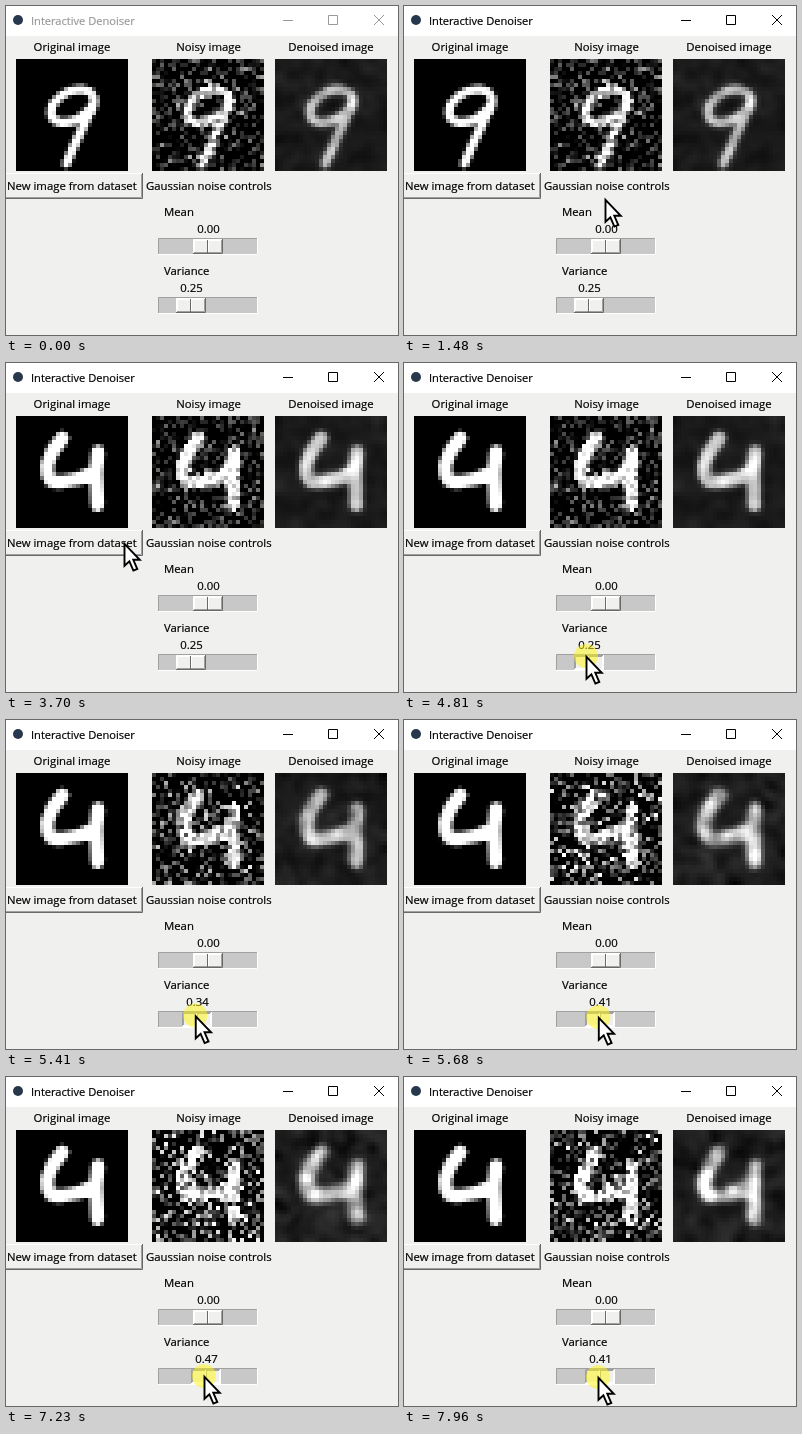
An HTML page with a canvas that plays this animation: 392 by 329 pixels, repeating every 8 s.

```html
<!DOCTYPE html>
<html lang="en">
<head>
<meta charset="utf-8">
<title>Interactive Denoiser</title>
<style>
html, body { margin: 0; width: 100%; height: 100%; overflow: hidden; background: #f0f0ef; }
#stage { position: relative; width: 392px; height: 329px; overflow: hidden; }
#stage > * { position: absolute; top: 0; left: 0; }
canvas { image-rendering: pixelated; width: 112px; height: 112px; }
#stage > canvas { top: 53px; }
#clean { left: 10px !important; }
#noisy { left: 146px !important; }
#denoised { left: 269px !important; }
svg { --ink: #000; }
text { font: 11.35px "Open Sans", "Noto Sans", sans-serif; fill: var(--ink); stroke: var(--ink); stroke-width: .2px; }
.mid { text-anchor: middle; }
#bar.idle { --ink: #999; }
#bar text { font-size: 11.1px; }
#bar path { fill: none; stroke: var(--ink); }
.raised { --hi: #fff; --lo: #696969; --mid: #a0a0a0; }
.sunken { --hi: #a0a0a0; --lo: #fff; --mid: #fff; }
.hi { fill: none; stroke: var(--hi); }
.lo { fill: none; stroke: var(--lo); }
.shade { fill: none; stroke: var(--mid); }
</style>
</head>
<body>
<div id="stage">
<svg width="392" height="329">
  <defs>
    <g id="trough">
      <rect width="100" height="17" fill="#c8c8c8"/>
      <path d="M.5 16V.5H99" fill="none" stroke="#a0a0a0"/>
      <path d="M0 16.5H99.5V0" fill="none" stroke="#fff"/>
    </g>
    <g id="thumb">
      <rect width="30" height="15" fill="#f0f0ef"/>
      <path class="hi" d="M.5 14V.5H29M1.5 13V1.5H28M15.5 1V13"/>
      <path class="shade" d="M1 13.5H28.5V1"/>
      <path class="lo" d="M0 14.5H29.5V0M14.5 1V14"/>
    </g>
  </defs>
  <g id="bar">
    <rect width="392" height="30" fill="#fff"/>
    <circle cx="12" cy="14" r="5" fill="#27384d"/>
    <text x="25" y="19">Interactive Denoiser</text>
    <path d="M277 14.5H287M322.5 9.5H331.5V18.5H322.5ZM368 9L378 19M378 9L368 19"/>
  </g>
  <text class="mid" x="66" y="45">Original image</text>
  <text class="mid" x="202.5" y="45">Noisy image</text>
  <text class="mid" x="325" y="45">Denoised image</text>
  <g id="button">
    <path class="hi" d="M0 167.5H137"/>
    <path class="shade" d="M0 191.5H135.5V168"/>
    <path class="lo" d="M0 192.5H136.5V167"/>
    <text id="caption" x="1" y="184">New image from dataset</text>
  </g>
  <text x="140" y="184">Gaussian noise controls</text>
  <text x="158" y="210">Mean</text>
  <text class="mid" x="202.5" y="227">0.00</text>
  <use href="#trough" x="152" y="232"/>
  <use href="#thumb" class="raised" x="187" y="233"/>
  <text x="158" y="269">Variance</text>
  <text class="mid" id="value" y="286"></text>
  <use href="#trough" x="152" y="291"/>
  <use href="#thumb" id="slider" y="292"/>
</svg>
<canvas id="clean" width="28" height="28"></canvas>
<canvas id="noisy" width="28" height="28"></canvas>
<canvas id="denoised" width="28" height="28"></canvas>
<svg width="392" height="329">
  <g id="pointer">
    <circle id="halo" r="12" fill="#fff614" fill-opacity=".52"/>
    <path d="M.5 .8V22.8L5.4 18.3L9.4 27.6L13.3 26L9.3 16.8H15.8Z"
      fill="#fff" stroke="#000" stroke-width="1.9"/>
  </g>
</svg>
</div>
<script>
const LOOP = 8000, N = 28, STEP = 70;
const $ = id => document.getElementById(id);

const digits = [
  { at: 0, width: 2.2, path: 'M18.9 13C20.3 10.5 19.8 8 16.5 7.7C12.5 7.4 8.6 10.5 8.7 13.3C8.9 16.5 13 16.3 15.5 15C17.5 14 19 12.5 19.6 10.5M18.9 12.5C17 16.5 15 20 12.6 26.2' },
  { at: 2160, width: 2.6, path: 'M7.5 8.5Q13 9 19.5 7.5Q18 13 15 17L12.5 24' },
  { at: 3300, width: 3.4, path: 'M11.6 5.5Q8.4 9 7.8 12.3C7.5 16 8.8 16.7 12 16.4Q16 16 19.5 14M20.5 9L20 14L20.4 22.2' }
];

// start, end, from x, y, to x, y
const moves = [
  [320, 950, 238, 318, 224, 203],
  [1480, 1830, 201, 193, 105, 173],
  [3700, 4190, 118, 180, 205, 275],
  [4260, 4470, 202, 280, 192, 289],
  [4540, 4610, 187, 291, 182, 293],
  [5210, 5490, 184, 294, 191, 296],
  [5680, 6010, 194.3, 297, 202, 296],
  [6080, 6150, 201, 296, 200, 296],
  [6480, 6480, 200, 297, 200, 297],
  [6820, 6820, 200, 298, 200, 298],
  [6960, 6960, 200, 299, 200, 299],
  [7160, 7230, 199, 299, 198, 299],
  [7760, 7960, 197, 299, 194, 300]
];
const presses = [[1020, 1150], [2030, 2160], [3160, 3300], [4810, LOOP]];
const DRAG = 4810, SECOND_DRAG = 7160;

const clamp = v => Math.max(0, Math.min(1, v));

function random(seed) {
  return () => {
    seed = (seed + 0x6d2b79f5) | 0;
    let r = Math.imul(seed ^ (seed >>> 15), seed | 1);
    r ^= r + Math.imul(r ^ (r >>> 7), r | 61);
    return ((r ^ (r >>> 14)) >>> 0) / 2 ** 32;
  };
}

function gaussian(rand) {
  return Math.sqrt(-2 * Math.log(1 - rand())) * Math.cos(2 * Math.PI * rand());
}

function rasterize({ path, width }) {
  const canvas = document.createElement('canvas');
  canvas.width = canvas.height = N;
  const ctx = canvas.getContext('2d');
  ctx.lineWidth = width;
  ctx.lineCap = ctx.lineJoin = 'round';
  ctx.stroke(new Path2D(path));
  const { data } = ctx.getImageData(0, 0, N, N);
  return Array.from({ length: N * N }, (_, i) => data[i * 4 + 3] / 255);
}

function blur(src) {
  return src.map((_, i) => {
    const x = i % N, y = (i - x) / N;
    let sum = 0, weight = 0;
    for (let dy = -1; dy <= 1; dy++) for (let dx = -1; dx <= 1; dx++) {
      const u = x + dx, v = y + dy;
      if (u < 0 || v < 0 || u >= N || v >= N) continue;
      const w = (2 - Math.abs(dx)) * (2 - Math.abs(dy));
      sum += w * src[v * N + u];
      weight += w;
    }
    return sum / weight;
  });
}

function paint(id, levels) {
  const ctx = $(id).getContext('2d');
  const img = ctx.createImageData(N, N);
  levels.forEach((level, i) => {
    img.data.fill(Math.round(255 * clamp(level)), i * 4, i * 4 + 3);
    img.data[i * 4 + 3] = 255;
  });
  ctx.putImageData(img, 0, 0);
}

for (const d of digits) {
  d.pixels = rasterize(d);
  d.soft = blur(d.pixels);
}

function drawImages(digit, sigma, seed) {
  const rand = random(seed);
  const noise = digit.pixels.map(() => gaussian(rand));
  const drift = blur(blur(noise));
  const mix = clamp(sigma * 2);
  paint('clean', digit.pixels);
  paint('noisy', digit.pixels.map((p, i) => p + sigma * noise[i]));
  paint('denoised', digit.pixels.map((p, i) => {
    const shape = p + (digit.soft[i] - p) * mix;
    return 0.08 + 0.08 * sigma + 0.22 * sigma * drift[i]
      + shape * (0.72 + sigma * drift[i]);
  }));
}

// Stepped like a screen capture, slowing down towards the end of each move.
function pointerAt(t) {
  const move = moves.filter(m => m[0] <= t).pop();
  if (!move) return null;
  const [start, end, x0, y0, x1, y1] = move;
  const steps = Math.round((end - start) / STEP);
  const u = steps ? Math.min(1, Math.floor((t - start) / (end - start) * steps + 1e-6) / steps) : 1;
  const k = u * (2 - u);
  return [x0 + (x1 - x0) * k, y0 + (y1 - y0) * k];
}

let shown = '';
function render(t) {
  const pos = pointerAt(t);
  const pressed = presses.some(([a, b]) => t >= a && t < b);
  const dragging = t >= DRAG;
  const onButton = pressed && t >= 2000 && !dragging;

  $('bar').setAttribute('class', t < 1020 ? 'idle' : '');
  $('pointer').style.display = pos ? '' : 'none';
  if (pos) $('pointer').setAttribute('transform', `translate(${pos})`);
  $('halo').style.display = pressed ? '' : 'none';
  $('button').setAttribute('class', onButton ? 'sunken' : 'raised');
  $('caption').setAttribute('transform', onButton ? 'translate(1 1)' : '');

  const sigma = dragging ? Math.round(Math.max(25, 41 + (pos[0] - 194) * 1.5)) / 100 : 0.25;
  const centre = Math.round(168.5 + 66 * sigma);
  $('value').textContent = sigma.toFixed(2);
  $('value').setAttribute('x', centre + 0.5);
  $('slider').setAttribute('x', centre - 15);
  $('slider').setAttribute('class', dragging ? 'sunken' : 'raised');

  const index = digits.filter(d => d.at <= t).length - 1;
  const seed = index * 1000 + Math.round(sigma * 100) + (t >= SECOND_DRAG ? 500 : 0);
  const key = `${index}/${seed}`;
  if (key !== shown) {
    drawImages(digits[index], sigma, seed);
    shown = key;
  }
}

const begin = performance.now();
function tick() {
  render((performance.now() - begin) % LOOP);
  requestAnimationFrame(tick);
}
tick();
</script>
</body>
</html>
```
